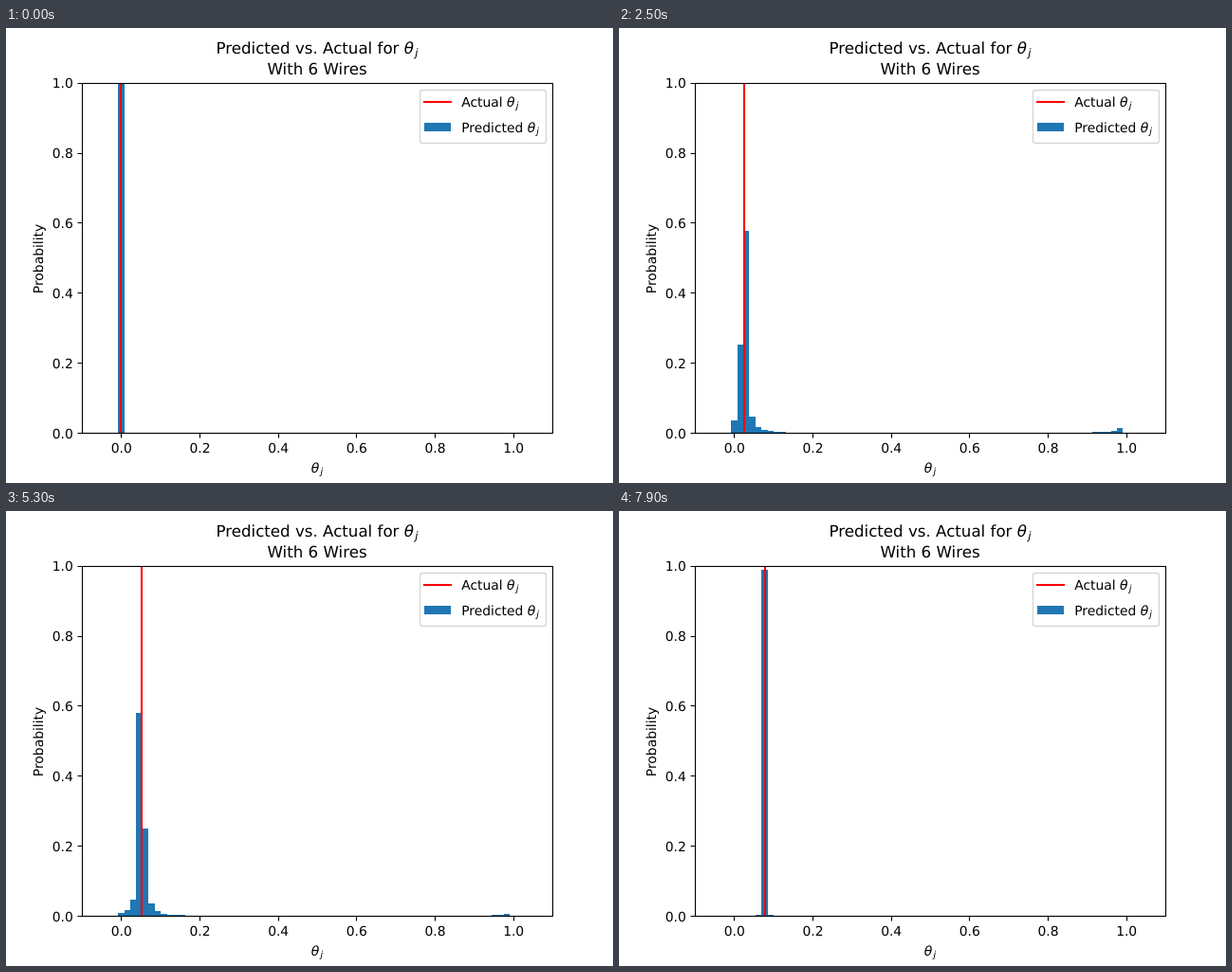
Recreate the animation shown at these times as an HTML page. Size 640 by 480 pixels, loop 8 s.

```html
<!DOCTYPE html>
<html lang="en">
<head>
<meta charset="utf-8">
<title>Predicted vs. Actual</title>
<style>
  html, body { margin: 0; width: 100%; height: 100%; overflow: hidden; background: #fff; }
  svg { display: block; width: 640px; height: 480px; }
  text { font: 13.89px "DejaVu Sans", sans-serif; text-rendering: geometricPrecision; white-space: pre; }
  .title { font-size: 16.67px; }
  .mid { text-anchor: middle; }
  .end { text-anchor: end; }
  .axis { fill: none; stroke: #000; stroke-width: 1.11; }
  .actual { stroke: #f00; stroke-width: 2.08; }
  .predicted { fill: #1f77b4; shape-rendering: crispEdges; }
</style>
</head>
<body>
<svg viewBox="0 0 640 480">
  <rect width="640" height="480" fill="#fff"/>
  <path id="bars" class="predicted"/>
  <path id="line" class="actual" d="M0 58V427"/>
  <g id="axes"></g>
  <g id="legend">
    <rect x="436.5" y="65.5" width="133" height="56" rx="2.78"
          fill="#fff" stroke="#ccc" stroke-width="1.39" opacity=".8"/>
    <path class="actual" d="M440 78H470"/>
    <rect class="predicted" x="441" y="100" width="28" height="9"/>
  </g>
</svg>
<script>
const WIRES = 6, STATES = 2 ** WIRES;
const STEPS = 80, STEP_MS = 100, THETA_STEP = 1 / 999;
const BASE = 427.2, HEIGHT = 369.6, ZERO_X = 80 + 496 / 12, UNIT_X = 496 / 1.2;

const byId = id => document.getElementById(id);
const xOf = v => ZERO_X + v * UNIT_X;
const yOf = p => BASE - p * HEIGHT;
const snap = v => Math.floor(v + 0.5);

// Theta with a subscript j, sized relative to the surrounding text.
const theta = size =>
  `<tspan font-style="italic">θ</tspan><tspan font-style="italic" dx="${size * 0.08}" dy="${size * 0.164}"` +
  ` style="font-size:${size * 0.7}px">j</tspan>`;
const label = (x, y, body, cls = "", extra = "") =>
  `<text x="${x}" y="${y}" class="${cls}" ${extra}>${body}</text>`;

function drawAxes() {
  let ticks = "", out = "";
  for (let i = 0; i <= 5; i++) {
    const v = i / 5, x = xOf(v), y = yOf(v);
    ticks += `M${snap(x) + 0.5} 427.5v5M80.5 ${snap(y) + 0.5}h-5`;
    out += label(x + 0.5, 448, v.toFixed(1), "mid");
    out += label(70.8, snap(y + 5.5), v.toFixed(1), "end");
  }
  out += `<path class="axis" d="${ticks}"/>`;
  out += `<rect class="axis" x="80.5" y="58.5" width="496" height="369"/>`;
  out += label(328, 27, "Predicted vs. Actual for " + theta(16.67), "title mid");
  out += label(328, 49, `With ${WIRES} Wires`, "title mid");
  out += label(328, 469, theta(13.89), "mid");
  out += label(0, 0, "Probability", "mid", 'transform="translate(39 243.5) rotate(-90)"');
  byId("axes").innerHTML = out;
  byId("legend").insertAdjacentHTML("beforeend",
    label(480.2, 83, "Actual " + theta(13.89)) +
    label(480.2, 110, "Predicted " + theta(13.89)));
}

// Phase estimation: chance of measuring state k for a given phase.
function probability(k, phase) {
  const d = Math.PI * (phase - k / STATES);
  if (Math.abs(d) < 1e-9) return 1;
  return (Math.sin(STATES * d) / (STATES * Math.sin(d))) ** 2;
}

function render(ms) {
  const phase = Math.floor(ms / STEP_MS) % STEPS * THETA_STEP;
  const bottom = snap(BASE);
  let d = "";
  for (let k = 0; k < STATES; k++) {
    const top = snap(yOf(probability(k, phase)));
    if (top >= bottom) continue;
    const left = snap(xOf((k - 0.5) / STATES)), right = snap(xOf((k + 0.5) / STATES));
    d += `M${left} ${bottom}V${top}H${right}V${bottom}Z`;
  }
  byId("bars").setAttribute("d", d);
  byId("line").setAttribute("transform", `translate(${snap(xOf(phase))} 0)`);
}

drawAxes();
render(0);
const start = performance.now();
(function tick() {
  render(performance.now() - start);
  requestAnimationFrame(tick);
})();
</script>
</body>
</html>
```
